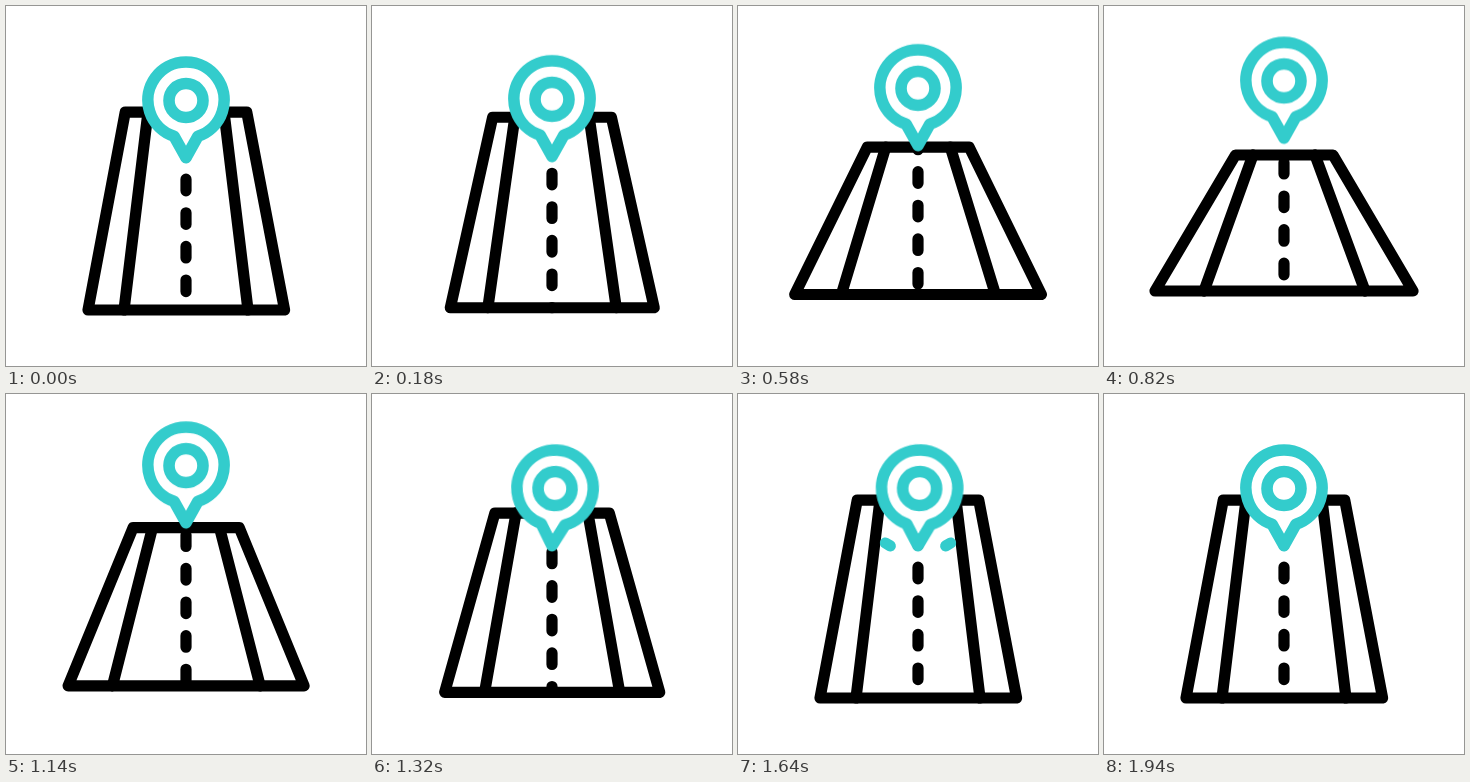
These frames come from a looping animation (360x360 px, 3000 ms). An HTML page:

```html
<!DOCTYPE html>
<html lang="en">
<head>
<meta charset="utf-8">
<title>Road and location pin</title>
<style>
  html, body { margin: 0; width: 100%; height: 100%; overflow: hidden; background: #fff; }
  svg { display: block; width: 100%; height: 100%; }

  path, circle {
    fill: none;
    stroke: #000;
    stroke-width: 11.2;
    stroke-linecap: round;
    stroke-linejoin: round;
  }
  .pin path, .pin circle { stroke: #3cc; stroke-width: 11.6; fill: #fff; }
  .spark { stroke: #3cc; stroke-dasharray: 15 40; }
  .lanes { stroke-dasharray: 11.6 22; }

  .edge, .sides, .lanes, .lift, .tilt, .spark {
    animation: 3s linear infinite both;
    transform-box: view-box;
  }

  /* The road tips back and returns on a sine curve. */
  .edge, .sides, .lanes { animation-timing-function: cubic-bezier(.364, 0, .636, 1); }
  .edge { animation-name: edge; }
  .sides { animation-name: sides; }
  .lanes { animation-name: lanes; }
  @keyframes edge {
    0%, 54%, 100% { d: path("M119.2 106.2H240.8L278.6 304H82Z"); }
    27% { d: path("M131.5 149H229L309 285H51Z"); }
  }
  @keyframes sides {
    0%, 54%, 100% { d: path("M142 106L118 304M218 106L242 304"); }
    27% { d: path("M149 149L100 285M211 149L261 285"); }
  }
  @keyframes lanes {
    0%, 54%, 100% { d: path("M180 106V304"); stroke-dashoffset: -67.2px; }
    27% { d: path("M180 149V285"); stroke-dashoffset: 26.2px; }
  }

  /* The pin rises, drops and wobbles on its tip. */
  .lift { animation-name: lift; }
  @keyframes lift {
    0% { transform: translateY(0); animation-timing-function: ease-in-out; }
    37.33%, 37.8% { transform: translateY(-23px); animation-timing-function: ease-in; }
    42.2%, 100% { transform: translateY(0); }
  }
  .tilt { animation-name: tilt; animation-timing-function: ease-in-out; transform-origin: 180px 151px; }
  @keyframes tilt {
    0%, 41.6% { transform: rotate(0deg); }
    44.67% { transform: rotate(3.4deg); }
    49.33% { transform: rotate(-3.2deg); }
    54.33% { transform: rotate(1.7deg); }
    59.33% { transform: rotate(-.9deg); }
    64.67%, 100% { transform: rotate(0deg); }
  }

  .spark { animation-name: spark; }
  @keyframes spark {
    0%, 46.66% { visibility: hidden; stroke-dashoffset: 15px; }
    46.67% { visibility: visible; stroke-dashoffset: 15px; }
    51.33% { visibility: visible; stroke-dashoffset: 0; }
    56.67% { visibility: visible; stroke-dashoffset: -15px; }
    56.68%, 100% { visibility: hidden; stroke-dashoffset: -15px; }
  }
</style>
</head>
<body>
<svg viewBox="0 0 360 360">
  <path class="edge" d="M119.2 106.2H240.8L278.6 304H82Z"/>
  <path class="sides" d="M142 106L118 304M218 106L242 304"/>
  <path class="lanes" d="M180 106V304"/>
  <path class="spark" d="M160.4 156.7L147.4 149"/>
  <path class="spark" d="M199.6 156.7L212.6 149"/>
  <g class="pin lift">
    <g class="tilt">
      <path d="M168 130.2A38.1 38.1 0 1 1 192 130.2L180 151.6Z"/>
      <circle cx="180" cy="94.5" r="17"/>
    </g>
  </g>
</svg>
</body>
</html>
```
